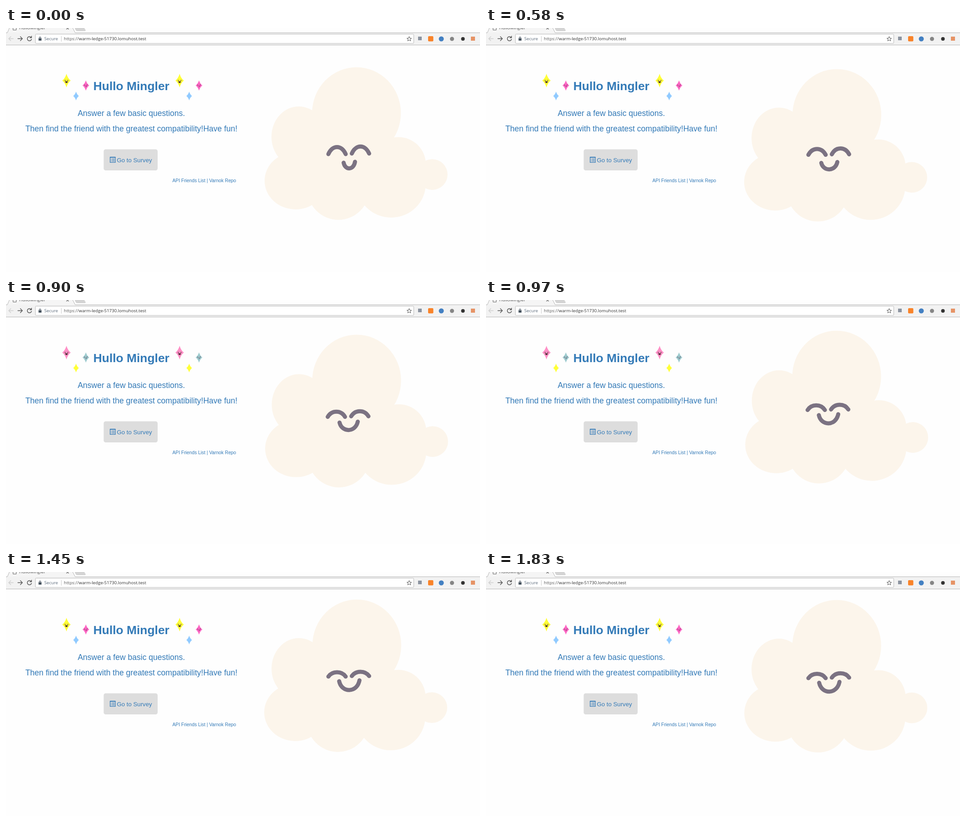
These frames come from a looping animation (1041 px wide and 538 px high, 1.91 s). An HTML page:

```html
<!DOCTYPE html>
<html lang="en">
<head>
<meta charset="utf-8">
<title>Hullo Mingler</title>
<style>
  html, body { margin: 0; width: 100%; height: 100%; overflow: hidden; background: #fefefe; }
  svg { display: block; width: 1041px; height: 538px; }
  .page { font-family: "Liberation Sans", Arial, sans-serif; fill: #337ab7; }
  .bar { font: 9.6px "Open Sans", "Noto Sans", sans-serif; }
  .mid { text-anchor: middle; }
  .line { fill: none; stroke-linecap: round; stroke-linejoin: round; }
  #sparks { --big: #ffff38; --side: #ff66c4; --low: #90caff; }
  #sparks.alt { --big: #ff8fc6; --side: #9ccace; --low: #ffff38; }
  .big { fill: var(--big); }
  .side { fill: var(--side); }
  .low { fill: var(--low); }
</style>
</head>
<body>
<svg viewBox="0 0 1041 538">
  <defs>
    <path id="spark" d="M0-1Q.32-.36 1 0Q.34.3 0 1Q-.34.3-1 0Q-.32-.36 0-1Z"/>
    <g id="trio">
      <use href="#spark" class="big" transform="translate(132.8 116) scale(9.2 15)"/>
      <g fill="#4a3030">
        <circle cx="129.8" cy="115.6" r="1"/>
        <circle cx="135.8" cy="115.6" r="1"/>
        <path d="M129.8 117.6H135.8Q135.3 121.4 132.8 121.4T129.8 117.6Z"/>
      </g>
      <use href="#spark" class="side" transform="translate(175.4 126.8) scale(7.3 11.3)"/>
      <path class="line" stroke="#59324c" d="M171.8 125.6L174 126.6M177 126L179 125.2M175 129.6Q175.6 127.6 177.4 128"/>
      <use href="#spark" class="low" transform="translate(153.8 150) scale(6.2 9.8)"/>
    </g>
  </defs>

  <rect width="1041" height="538" fill="#fefefe"/>

  <g class="bar">
    <path d="M0 10H1041V37H0Z" fill="#f2f2f2"/>
    <path d="M3 10.5L7.5 0H146.5L152 10.5Z" fill="#f5f5f5"/>
    <path class="line" stroke="#b4b4b4" d="M0 10.5H3L7.5 0M146.5 0L152 10.5H1041M0 37.5H1041"/>
    <path d="M151 0H172L175 5Q175 7 172 7H157Q154 7 153 5Z" fill="#d4d4d4"/>
    <path class="line" stroke="#666" d="M15.5 0V4.5H22.5V0"/>
    <text x="29" y="3" fill="#555">HulloMingler</text>
    <path class="line" stroke="#666" stroke-width="1.2" d="M133-2L137.5 2.5M137.5-2L133 2.5"/>

    <path class="line" stroke="#cfcfcf" stroke-width="1.4" d="M16 23.5H6M10.5 19L6 23.5L10.5 28"/>
    <path class="line" stroke="#555" stroke-width="1.4" d="M26 23.5H36M31.5 19L36 23.5L31.5 28"/>
    <path class="line" stroke="#555" stroke-width="1.5" d="M55 20.5A4.7 4.7 0 1 0 56 25M56 18V21.5H52.5"/>

    <rect x="64.5" y="13.5" width="831" height="20.5" rx="2" fill="#fff" stroke="#b9b9b9"/>
    <rect x="71.5" y="22.8" width="6.5" height="5" fill="#43505c"/>
    <path class="line" stroke="#43505c" stroke-width="1.2" d="M73 23V21.7A1.75 1.75 0 0 1 76.5 21.7V23"/>
    <text x="84" y="27.3" fill="#5d6c7c">Secure</text>
    <path d="M121.5 18V30" stroke="#c8c8c8"/>
    <text x="127" y="27.3" fill="#333"><tspan fill="#5a5a5a">https://</tspan>warm-ledge-51730.lomuhost.test</text>
    <path class="line" stroke="#555" d="M885.5 19L887 22.4L890.5 22.7L887.8 25L888.7 28.5L885.5 26.6L882.3 28.5L883.2 25L880.5 22.7L884 22.4Z"/>

    <rect x="905" y="19" width="8" height="8" fill="#8b93a0"/>
    <rect x="927" y="18" width="11.5" height="11.5" rx="2" fill="#f98329"/>
    <circle cx="956" cy="24" r="5.5" fill="#4380c2"/>
    <circle cx="979.5" cy="24" r="4.5" fill="#858585"/>
    <circle cx="1003.5" cy="24" r="4" fill="#333"/>
    <rect x="1021" y="19" width="9" height="9" fill="#e69366"/>
  </g>

  <g class="page">
    <g id="sparks">
      <use href="#trio"/>
      <use href="#trio" x="248.5"/>
    </g>
    <text class="mid" x="275.3" y="136.6" font-size="26.4" font-weight="700">Hullo Mingler</text>
    <text class="mid" x="275.3" y="194" font-size="17.55">Answer a few basic questions.</text>
    <text class="mid" x="275.3" y="228" font-size="17.55">Then find the friend with the greatest compatibility!Have fun!</text>
    <rect x="214.5" y="267.5" width="118.5" height="46.5" rx="4.5" fill="#ddd"/>
    <path class="line" stroke="#337ab7" stroke-width="1.2" d="M228.6 284.5H240.2V296.4H228.6ZM228.6 285.5H240.2M230.5 288.5H231M233 288.5H238.3M230.5 291H231M233 291H238.3M230.5 293.5H231M233 293.5H238.3"/>
    <text x="243.6" y="295.5" font-size="13.2">Go to Survey</text>
    <text x="365.5" y="339.5" font-size="10.25">API Friends List | Varnok Repo</text>
  </g>

  <g id="cloud" fill="#fcf5eb">
    <ellipse cx="769.7" cy="187.5" rx="97.5" ry="101"/>
    <ellipse cx="643" cy="240" rx="60" ry="67"/>
    <ellipse cx="636" cy="337" rx="68" ry="63"/>
    <circle cx="730" cy="355" r="68"/>
    <ellipse cx="846" cy="343" rx="76" ry="75"/>
    <circle cx="862" cy="300.5" r="60"/>
    <circle cx="936" cy="323" r="33.8"/>
    <path d="M643 240L770 187L862 300L846 343L730 355L636 337Z"/>
  </g>
  <path id="face" class="line" stroke="#7b7282" stroke-width="9"/>
</svg>

<script>
  const LOOP = 1910;
  // the picture holds still between beats
  const beats = [0, 70, 260, 500, 580, 850, 900, 970, 1050, 1170, 1220, 1280, 1450, 1690, 1830];

  const [cloud, face, sparks] = ['cloud', 'face', 'sparks'].map(id => document.getElementById(id));
  const clamp = (v, lo, hi) => Math.min(hi, Math.max(lo, v));
  const span = (t, from, to) => clamp((t - from) / (to - from), 0, 1);
  const easeOut = u => 1 - (1 - u) ** 4;

  // one curve through (x ± w, y ± lean) that swings d below its ends
  const bow = (x, y, w, d, pull, lean) => {
    const mid = y + d * 4 / 3;
    return `M${x - w} ${y + lean}C${x - w * pull} ${mid} ${x + w * pull} ${mid} ${x + w} ${y - lean}`;
  };

  function draw() {
    const now = performance.now() % LOOP;
    const t = beats.findLast(b => b <= now);

    const wake = easeOut(span(t, 420, 850));
    const grin = span(t, 500, 850);
    const lift = easeOut(span(t, 850, 1280));
    const settle = span(t, 1780, LOOP);
    const dip = Math.sin(Math.PI * span(t, 420, 850));

    const swing = Math.cos((clamp(t, 320, 1280) - 560) / 400 * Math.PI);
    const tilt = .2 + .55 * swing - .4 * settle;
    const lean = Math.min(0, tilt);
    const y = 4.5 * dip - 25.8 * lift + 2.6 * settle;
    cloud.setAttribute('transform', `translate(${-2.5 * lean} ${y}) rotate(${tilt} 770 255)`);

    const x = 753 + 5 * lean;
    const eye = 278 + y - 3 * wake - 18.6 * lift + 6.4 * settle;
    const arch = -15.5 + 3 * wake + 3 * lift;
    const mouth = eye + 18 - 5 * grin - 3.8 * lift;
    face.setAttribute('d',
      bow(x - 26, eye, 19, arch, .53, 0) +
      bow(x + 25.5, eye - 1.2, 19, arch, .53, 0) +
      bow(x + 1, mouth, 12.5 + 6 * wake + 3.8 * lift, 13.5 + 2 * wake + 5 * lift, .75, 1));

    sparks.classList.toggle('alt', (t + 339) % 404 < 104);
    requestAnimationFrame(draw);
  }
  draw();
</script>
</body>
</html>
```
